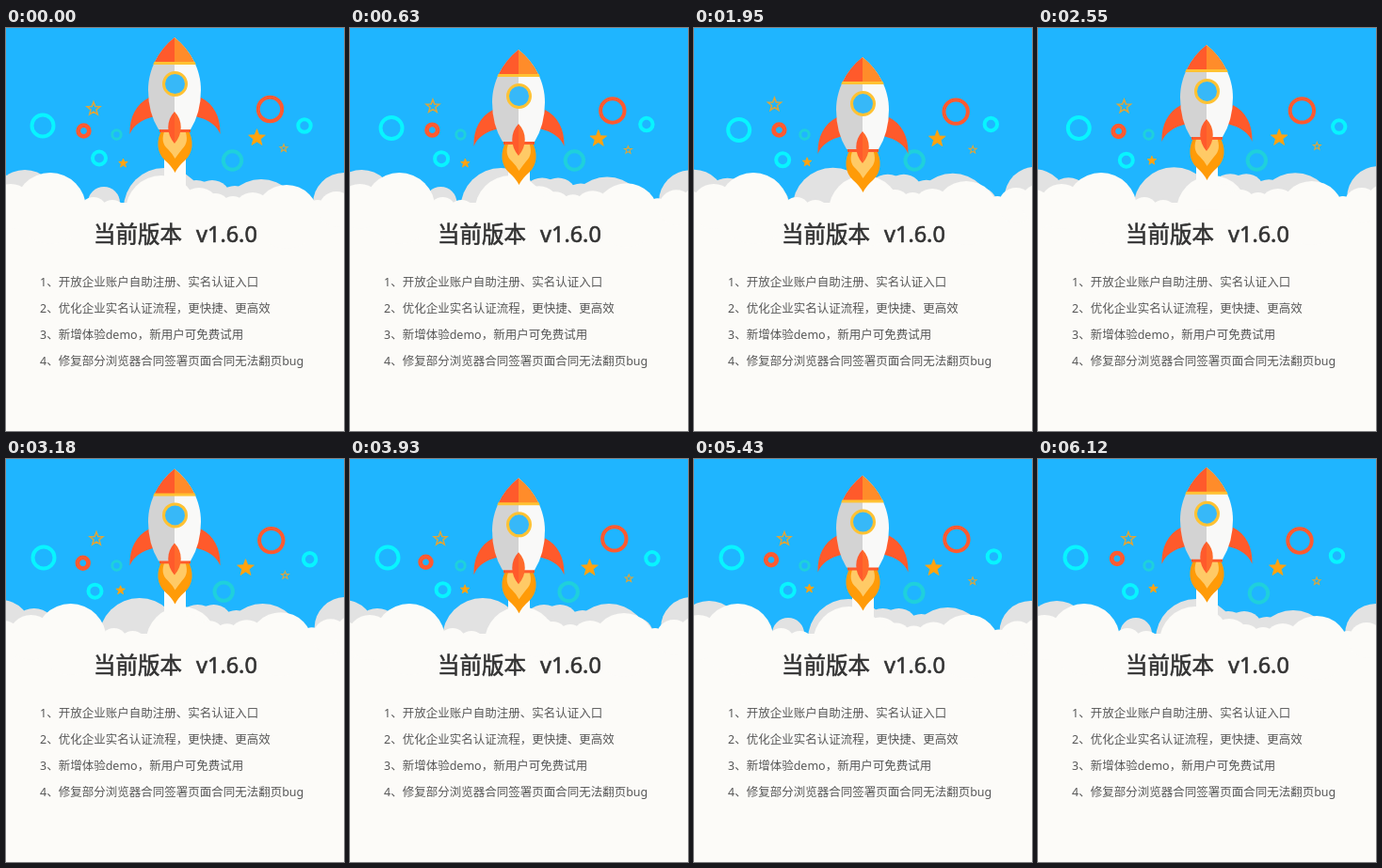
An HTML page that plays this animation: 359x429 px, repeating every 6210 ms.

```html
<!DOCTYPE html>
<html lang="zh-CN">
<head>
<meta charset="utf-8">
<title>版本更新</title>
<style>
  html, body { margin: 0; width: 100%; height: 100%; overflow: hidden; background: #fcfbf8; }
  svg { display: block; width: 359px; height: 429px; }

  /* Stops --a to --e: 0, 1500, 3000, 4560 and 6120 ms */
  .drift { animation: drift 6210ms linear infinite; }
  @keyframes drift {
    0% { translate: var(--a); }
    24.15% { translate: var(--b); }
    48.31% { translate: var(--c); }
    73.43% { translate: var(--d, var(--c)); }
    98.55%, 100% { translate: var(--e, var(--d, var(--c))); }
  }
  /* Stops --b to --f: 1500, 3000, 3930, 4740 and 6120 ms */
  .cloud { animation: cloud 6210ms linear infinite; }
  @keyframes cloud {
    0% { translate: 0 0; }
    24.15% { translate: var(--b); }
    48.31% { translate: var(--c); }
    63.29% { translate: var(--d); }
    76.33% { translate: var(--e); }
    98.55%, 100% { translate: var(--f); }
  }

  .ring { fill: none; stroke-width: 4; }
  .cyan { stroke: #08f4ff; }
  .red { stroke: #ff5a30; }
  .teal { stroke: #1fd0dc; }
  .star { fill: #ffa30f; stroke: #ffa30f; stroke-width: .8; stroke-linejoin: round; }
  .line { fill: none; stroke: #e0a538; }
  .grey { fill: #e2e2e2; }
  .white { fill: #fcfbf8; }
  .hot { fill: #ff5a2b; }
  .warm { fill: #ff8c2a; }
  .gold { fill: #ffc233; }

  text { font-family: "Noto Sans", "Noto Sans CJK SC", "Noto Sans CJK", sans-serif; white-space: pre; }
  .title { font-size: 23.5px; fill: #333; stroke: #333; stroke-width: .6; }
  .notes { font-size: 12.5px; fill: #575757; }
</style>
</head>
<body>
<svg viewBox="0 0 359 429">
  <defs>
    <path id="star" d="M0-1 .25-.34 .95-.31 .4.13 .59.81 0 .42-.59.81-.4.13-.95-.31-.25-.34Z" vector-effect="non-scaling-stroke"/>
  </defs>
  <rect width="359" height="190" fill="#1fb5ff"/>

  <g class="drift" style="--a:39px 104px;--b:51px 110px;--c:40px 105px"><circle class="ring cyan" r="11.5"/></g>
  <g class="drift" style="--a:82.5px 109.5px;--b:94px 107.5px;--c:82px 111px;--d:79.5px 109px;--e:84px 106px"><circle class="ring red" r="5.8" style="stroke-width:4.8"/></g>
  <g class="drift" style="--a:93px 86px;--b:81px 80px;--c:96px 85px"><use href="#star" class="line" stroke-width="1.5" transform="scale(7.3)"/></g>
  <circle class="ring teal" cx="117.5" cy="113.5" r="4.7" style="stroke-width:3"/>
  <g class="drift" style="--a:99px 138.5px;--b:94.5px 140px;--c:93.5px 141px;--d:102px 138px;--e:98px 141px"><circle class="ring cyan" r="7"/></g>
  <g class="drift" style="--a:124.5px 144px;--b:119.5px 144px;--c:121.5px 140px;--d:122.5px 138px"><use href="#star" class="star" transform="scale(5)"/></g>
  <g class="drift" style="--a:240.5px 141px;--b:235.5px 141px;--c:231px 141px;--d:233px 142px;--e:234.5px 143px"><circle class="ring teal" r="9.7"/></g>
  <g class="drift" style="--a:266.5px 117px;--b:260px 119px;--c:254.5px 116px"><use href="#star" class="star" transform="scale(9.3)"/></g>
  <g class="drift" style="--a:295px 128px;--b:296px 132.5px;--c:296.5px 123px;--d:296px 130px"><use href="#star" class="line" stroke-width="1.1" transform="scale(4.2)"/></g>
  <g class="drift" style="--a:280.5px 86.5px;--b:276.5px 90px;--c:282px 87px;--d:280px 83.5px;--e:278px 87px"><circle class="ring red" r="12.7"/></g>
  <g class="drift" style="--a:317px 104px;--b:312px 100.5px;--c:323px 107px;--d:319.5px 105px;--e:317.5px 103px"><circle class="ring cyan" r="6.7"/></g>

  <g class="cloud grey" style="--b:-18px 0;--c:-26px -1px;--d:-27px -1px;--e:-8px 0;--f:0 0">
    <circle cx="-12" cy="183" r="29"/><circle cx="20" cy="185" r="34"/><circle cx="56" cy="184" r="24"/>
    <circle cx="104" cy="186" r="17"/><circle cx="168" cy="192" r="43"/>
  </g>
  <g class="cloud grey" style="--b:5px -6px;--c:1px -7px;--d:4px -7px;--e:-3px -6px;--f:0 0">
    <circle cx="202" cy="185" r="23"/><circle cx="219" cy="182" r="20"/><circle cx="243" cy="188" r="20"/>
    <circle cx="271" cy="203" r="42"/><circle cx="300" cy="194" r="18"/><circle cx="359" cy="187" r="33"/>
  </g>

  <rect class="white" y="186" width="359" height="243"/>
  <g class="cloud white" style="--b:13px 0;--c:23px 0;--d:16px 0;--e:-3px 0;--f:2px 0">
    <circle cx="-25" cy="194" r="22"/><circle cx="5" cy="190" r="24"/><circle cx="47" cy="192" r="38"/>
    <circle cx="93" cy="194" r="14"/><circle cx="113" cy="197" r="14"/><circle cx="165" cy="195" r="38"/>
  </g>
  <g class="cloud white" style="--b:-10px -4px;--c:-6px -4px;--d:-7px -3px;--e:-13px -3px;--f:-2px 0">
    <circle cx="205" cy="192" r="22"/><circle cx="222" cy="193" r="17"/><circle cx="241" cy="193" r="14"/>
    <circle cx="262" cy="195" r="20"/><circle cx="298" cy="201" r="34"/><circle cx="331" cy="195" r="12"/>
    <circle cx="351" cy="193" r="19"/><circle cx="376" cy="190" r="20"/>
  </g>

  <g class="drift" style="--a:179px 10px;--b:179px 41px;--c:179px 8px;--d:179px 28.7px;--e:179px 8.7px">
    <rect class="white" x="-11" y="118" width="23" height="58"/>
    <path fill="#ff9b08" d="M-13 98C-20 109-19 123-10 131Q-3 137 .5 144Q4 137 11 131C20 123 21 109 14 98Z"/>
    <path fill="#ffca66" d="M-10 98C-14 107-13 114-7 119Q-2 124 .5 129Q4 124 8 119C14 113 14 107 11 98Z"/>
    <g class="hot">
      <path id="fin" d="M-27 64C-41 71-48 85-47.500 103Q-42 89-21 84Z"/>
      <use href="#fin" transform="translate(1) scale(-1 1)"/>
      <rect x="-16" y="97" width="33" height="4"/>
    </g>
    <path fill="#d3d3d3" d="M0 0C-17 14-28 34-28 56Q-28 80-17 98H0Z"/>
    <path fill="#f9f9f8" d="M0 0C17 14 28 34 28 56Q28 80 17 98H0Z"/>
    <path class="hot" d="M0 0Q-14 11-21.500 27H0Z"/>
    <path class="warm" d="M0 0Q14 11 21.500 27H0Z"/>
    <path class="gold" d="M-21.500 26H21.500L22.700 29H-22.700Z"/>
    <circle cx=".5" cy="49.500" r="12" fill="#37b8f8" stroke="#ffc233" stroke-width="3"/>
    <path class="hot" d="M0 79C-9 88-9 103 0 113Z"/>
    <path fill="#ff6a2b" d="M0 79C9 88 9 103 0 113Z"/>
  </g>

  <g class="title"><text x="93" y="228">当前版本</text><text x="202" y="227.500">v1.6.0</text></g>
  <g class="notes">
    <text x="36" y="275">1、开放企业账户自助注册、实名认证入口</text>
    <text x="36" y="303">2、优化企业实名认证流程，更快捷、更高效</text>
    <text x="36" y="331">3、新增体验demo，新用户可免费试用</text>
    <text x="36" y="359">4、修复部分浏览器合同签署页面合同无法翻页bug</text>
  </g>
</svg>
</body>
</html>
```
